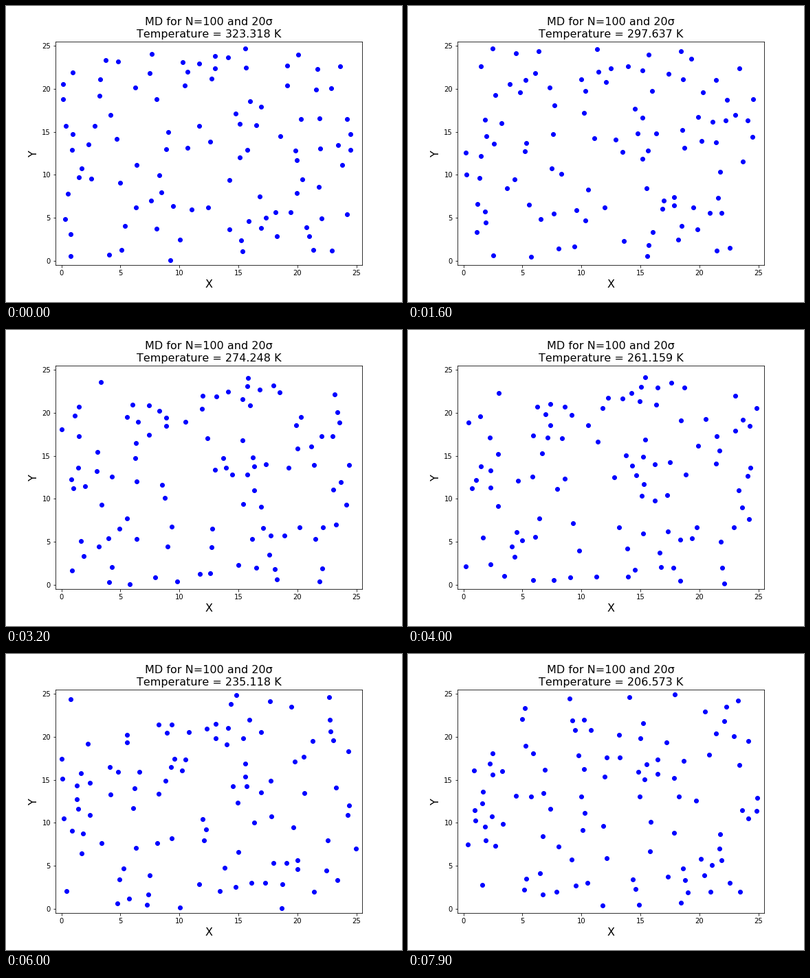
A matplotlib script for the animation above (8 s loop, 576x432 px).

```python
import numpy as np
import matplotlib.pyplot as plt
from matplotlib.animation import FuncAnimation

FRAMES, INTERVAL = 80, 100
BOX, N = 25.0, 100
SIGMA = 0.95          # particle diameter
SPEED = 0.08          # thermal speed per axis, box units per frame
EPS = SPEED ** 2 / 2.7
SUBSTEPS = 10

# Steady cooling through a few readings.
TEMPS = np.interp(
    np.arange(FRAMES),
    [0, 9, 23, 32, 48, 60, 79],
    [323.318, 307.585, 287.69, 274.248, 248.07, 235.118, 206.573])


def wrap(d):
    """Shortest separation in the periodic box."""
    return d - BOX * np.round(d / BOX)


def scatter(rng, gap):
    """Random points that keep a minimum gap."""
    pts = [rng.uniform(0, BOX, 2)]
    while len(pts) < N:
        p = rng.uniform(0, BOX, 2)
        if np.hypot(*wrap(np.array(pts) - p).T).min() > gap:
            pts.append(p)
    return np.array(pts)


def forces(pos):
    """Lennard-Jones forces between all pairs."""
    d = wrap(pos[:, None] - pos[None])
    r2 = (d ** 2).sum(axis=2)
    np.fill_diagonal(r2, np.inf)
    r2 = np.maximum(r2, (0.8 * SIGMA) ** 2)
    s6 = (SIGMA ** 2 / r2) ** 3
    pull = np.where(r2 < (2.5 * SIGMA) ** 2,
                    24 * EPS * (2 * s6 ** 2 - s6) / r2, 0)
    return (pull[:, :, None] * d).sum(axis=1)


def rescale(vel, temp):
    """Set the kinetic energy to the given temperature."""
    vel = vel - vel.mean(axis=0)
    return vel * SPEED * np.sqrt(temp / TEMPS[0] / (vel ** 2).mean())


def simulate():
    rng = np.random.default_rng(7)
    pos = scatter(rng, 1.05 * SIGMA)
    vel = rng.normal(size=(N, 2))
    acc = forces(pos)
    dt = 1 / SUBSTEPS
    path = []
    for temp in TEMPS:
        path.append(pos.copy())
        vel = rescale(vel, temp)
        for _ in range(SUBSTEPS):
            vel = vel + acc * dt / 2
            pos = (pos + vel * dt) % BOX
            acc = forces(pos)
            vel = vel + acc * dt / 2
    return path


path = simulate()

plt.rcParams["font.family"] = "DejaVu Sans"
plt.rcParams["text.kerning_factor"] = 6
fig = plt.figure(figsize=(8, 6), dpi=72, facecolor="white")
ax = fig.add_axes([0.125, 0.125, 0.775, 0.755])
ax.set(xlim=(-0.5, 25.5), ylim=(-0.5, 25.5),
       xticks=range(0, 26, 5), yticks=range(0, 26, 5))
ax.set_xlabel("X", fontsize=16)
ax.set_ylabel("Y", fontsize=16)
title = ax.set_title("", fontsize=16)
dots, = ax.plot([], [], "o", color="blue", markersize=6)


def draw(i):
    dots.set_data(*path[i].T)
    title.set_text(f"MD for N={N} and 20σ\n"
                   f"Temperature = {round(float(TEMPS[i]), 3)} K")
    return dots, title


anim = FuncAnimation(fig, draw, frames=FRAMES, interval=INTERVAL,
                     repeat=True, repeat_delay=0, blit=False)
plt.show()
```
